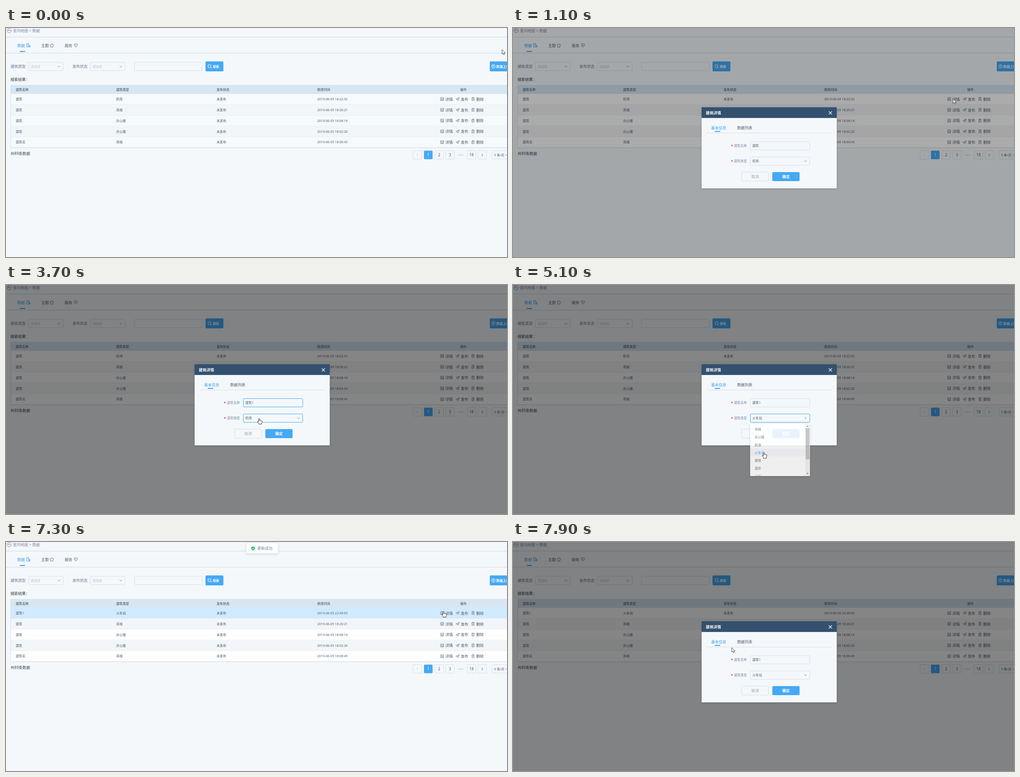
Write an HTML page that moves like this. It is 1105 by 507 pixels and loops after 8 s.

```html
<!DOCTYPE html>
<html lang="zh-CN">
<head>
<meta charset="utf-8">
<title>室内地图</title>
<style>
html, body { margin: 0; width: 100%; height: 100%; overflow: hidden; background: #f4f8fb; }
svg { display: block; width: 1105px; height: 507px; }
text { font-family: 'Noto Sans', 'Noto Sans CJK SC', 'Noto Sans CJK', sans-serif; white-space: pre; }
</style>
</head>
<body>
<svg id="stage" viewBox="0 0 1105 507" xmlns="http://www.w3.org/2000/svg"></svg>
<script>
const BLUE = '#45a9f5', INK = '#515a6e', LABEL = '#6b7690', EDGE = '#d7dfe7', PAPER = '#f4f8fb';
const BIG = 8.4, SMALL = 7.1;

// ---- drawing helpers ----
const text = (x, cy, str, size, fill, extra = '') =>
  `<text x="${x}" y="${(cy + size * 0.37).toFixed(2)}" font-size="${size}" fill="${fill}" ${extra}>${str}</text>`;
const mid = (x, cy, str, size, fill, extra = '') => text(x, cy, str, size, fill, 'text-anchor="middle" ' + extra);
const rect = (x, y, w, h, fill, extra = '') =>
  `<rect x="${x}" y="${y}" width="${w}" height="${h}" fill="${fill}" ${extra}/>`;
const box = (x, y, w, h, extra = '', fill = PAPER) => rect(x, y, w, h, fill, `rx="2" stroke="${EDGE}" ${extra}`);
const path = (x, y, d, color, width = 0.9, extra = '') =>
  `<path transform="translate(${x} ${y})" d="${d}" fill="none" stroke="${color}" stroke-width="${width}" stroke-linejoin="round" ${extra}/>`;
const chevron = (x, y, color = '#7f8794') => path(x, y, 'M-2.6-1.3L0 1.3L2.6-1.3', color, 1);
const group = (id, body, extra = '') => `<g id="${id}" ${extra}>${body}</g>`;
const BOLD = 'font-weight="700"';

const ICON = {
  back: 'M-5 0a5 5 0 1 0 10 0a5 5 0 1 0-10 0M-.4-2.6L-2.8-.6L-.4 1.3M-2.6-.6H1Q2.8-.4 2.4 2',
  data: 'M-3.5-4H1.5V-1M-3.5-4V3.5H0M-1.8-1.8H0M-1.8.4H-.5M1 0H4V3.8H1ZM1 1.9H4',
  star: 'M0-4L1.5-1.8L4.2-1.2L2.5 1L2.6 3.8H-2.6L-2.5 1L-4.2-1.2L-1.5-1.8Z',
  heart: 'M0 3.8L-3.6-.2Q-4.6-3.4-2-3.7Q-.5-3.5 0-2.2Q.5-3.5 2-3.7Q4.6-3.4 3.6-.2ZM-1.2 0H1.2',
  search: 'M-3.8-.6a3.2 3.2 0 1 0 6.4 0a3.2 3.2 0 1 0-6.4 0M1.8 1.8L4 4',
  upload: 'M-4 0a4 4 0 1 0 8 0a4 4 0 1 0-8 0M0 2.3V-2M-1.7-.4L0-2.1L1.7-.4',
  detail: 'M-3.3-3.3H3.3V3.3H-3.3ZM-3.3-.8H3.3M-1.6 1.2H1.6M-1.5 3V1.3M1.5 3V1.3',
  plane: 'M-3.6 0L3.6-3.4L1.8 3.2L-.6 1.2ZM3.6-3.4L-.6 1.2V3.4',
  trash: 'M-3.2-2.4H3.2M-1.2-2.4V-3.6H1.2V-2.4M-2.4-2.4V3.4H2.4V-2.4M-.8-.6V1.8M.8-.6V1.8'
};

// ---- page ----
const rows = [
  ['建筑', '机场', '18:22:52'],
  ['建筑', '商城', '18:20:21'],
  ['建筑', '办公楼', '18:08:16'],
  ['建筑', '办公楼', '18:02:20'],
  ['建筑名', '商城', '18:00:45']
];
const TOP = 145.8, STEP = 23.86;

function header() {
  const line = y => rect(0, y, 1105, 1, '#cfd8e0');
  return path(7, 5.5, ICON.back, '#7d8694') +
    text(15.3, 5.5, '室内地图 &gt; 数据', BIG, '#7a86a2') + line(19.5) + line(55) +
    text(25, 39, '数据', BIG, '#3d9df3') + path(49, 38.5, ICON.data, '#3d9df3') + rect(30.5, 51, 11.5, 2, '#3d9df3') +
    text(77.7, 39, '主题', BIG, INK) + path(101, 38.5, ICON.star, INK, 0.8) +
    text(129.5, 39, '服务', BIG, INK) + path(154, 38.5, ICON.heart, INK, 0.8);
}

function filters() {
  const pick = x => box(x, 76, 77, 18.5) + text(x + 4.8, 85.3, '请选择', SMALL, '#bcc3cc') + chevron(x + 67.3, 85.3);
  return text(10, 84.5, '建筑类型', BIG, LABEL) + pick(49.5) +
    text(146.5, 84.5, '发布状态', BIG, LABEL) + pick(186) +
    box(283.5, 76, 149, 18.5) +
    rect(440, 74, 39.5, 22, BLUE, 'rx="2"') + path(449.3, 85, ICON.search, '#fff', 1.1) +
    text(456, 85.5, '搜索', SMALL, '#fff', BOLD) +
    rect(1067, 74, 60, 22, BLUE, 'rx="2"') + path(1075, 85, ICON.upload, '#fff', 1) +
    text(1081.3, 85.5, '数据上传', 7.4, '#fff', BOLD) +
    text(10, 114, '搜索结果：', BIG, '#303642');
}

function table() {
  const heads = [[21.5, '建筑名称'], [243, '建筑类型'], [464.5, '发布状态'], [686.5, '修改时间'], [1001.7, '操作']];
  const acts = [[962, 'detail', '详情'], [996, 'plane', '发布'], [1030, 'trash', '删除']];
  let s = rect(10, 126, 1095, 20, '#d6e6f3') + heads.map(h => text(h[0], 136.4, h[1], SMALL, '#3b4350')).join('');
  rows.forEach((r, i) => {
    const y = TOP + i * STEP, c = 157.2 + i * 23.9;
    s += rect(10.5, y, 1095, STEP, i % 2 ? '#f2f6f9' : '#fff', i % 2 ? '' : 'class="stripe"');
    s += rect(10.5, y, 1095, STEP, '#d1eafe', 'class="hover"');
    s += rect(10.5, y + STEP - 0.8, 1095, 0.8, '#e3e9ee');
    s += text(21.5, c, r[0], SMALL, INK, `id="name${i}"`) + text(243, c, r[1], SMALL, INK, `id="type${i}"`) +
      text(464.5, c, '未发布', SMALL, INK) + text(686.5, c, '2019-06-05 ' + r[2], SMALL, INK, `id="time${i}"`);
    s += acts.map(a => path(a[0], c, ICON[a[1]], '#6c7480', 0.8) + text(a[0] + 7, c + 0.3, a[2], BIG, INK)).join('');
  });
  return s + rect(10, 126, 0.9, 139, '#d3dee8') + rect(10, 264.6, 1095, 1, '#d3dee8');
}

function pager() {
  const cells = [[907.5, ''], [931.4, '1'], [955.3, '2'], [979.1, '3'], [1026.8, '18'], [1050.5, '']];
  const arrow = (x, k, c) => path(x, 281.2, `M${-1.3 * k}-2.6L${1.3 * k} 0L${-1.3 * k} 2.6`, c, 1);
  return text(10, 277.8, '共89条数据', BIG, '#3b4350') +
    cells.map(([x, n]) => (n === '1' ? rect(x - 9.5, 271.5, 19, 19, BLUE, 'rx="2"') : box(x - 9.5, 271.5, 19, 19)) +
      mid(x, 281, n, BIG, n === '1' ? '#fff' : INK)).join('') +
    arrow(907.5, -1, '#c3c9d1') + arrow(1050.5, 1, INK) +
    [-4, 0, 4].map(d => `<circle cx="${1002.8 + d}" cy="281.3" r="1" fill="#a5adb8"/>`).join('') +
    box(1072, 271.5, 50, 18.5) + text(1076.5, 281, '5 条/页', SMALL, INK) + chevron(1104, 281);
}

// ---- dialog ----
function dialog() {
  const label = (cy, str) => mid(482.8, cy + 1.6, '*', 8.4, '#f0482f', BOLD) + text(487.5, cy, str, SMALL, '#7b88a8');
  return rect(416, 176, 298, 179, PAPER, 'filter="url(#shade)"') + rect(416, 175.5, 298, 23.7, '#33506f') +
    text(425.3, 187.8, '建筑详情', BIG, '#fff', BOLD) + path(700, 188, 'M-3.5-3.5L3.5 3.5M3.5-3.5L-3.5 3.5', '#fff', 1.1) +
    text(437, 221, '基本信息', BIG, '#3d9df3') + text(494.5, 221, '数据列表', BIG, INK) +
    rect(426, 232, 278, 1, '#d5dee6') + rect(445, 228, 12, 2, '#3d9df3') +
    label(260, '建筑名称') + box(523.5, 251.5, 131, 18.5, 'id="nameBox"') + text(528, 260.8, '建筑', SMALL, INK, 'id="nameVal"') +
    rect(542, 257, 0.8, 9, '#303642', 'id="caret"') +
    label(294.3, '建筑类型') + box(523.5, 285.5, 131, 18.5, 'id="typeBox"') + text(528, 294.8, '机场', SMALL, INK, 'id="typeVal"') +
    group('turn', chevron(0, 0)) +
    box(504.5, 319, 59, 20, 'stroke="#d0dae6"') + mid(534, 329, '取消', BIG, '#97a1b6') +
    rect(572, 319, 60, 20, BLUE, 'rx="2"') + mid(602, 329, '确定', BIG, '#fff', BOLD);
}

function menu() {
  const names = ['商城', '办公楼', '机场', '火车站', '展馆', '酒店', '小区'];
  const tri = (y, k) => `<path d="M647.5 ${y + k}h4l-2 ${-2 * k}z" fill="#555"/>`;
  return rect(523, 307, 132, 116, '#fff', 'rx="2" filter="url(#shade)"') +
    rect(523, 362.3, 122, 17.3, '#f5f7fa', 'id="pick"') +
    `<g clip-path="url(#list)">` +
    names.map((n, i) => text(533, 319.4 + i * 17.25, n, SMALL, '#6a6f78', `class="opt"`)).join('') + '</g>' +
    rect(645, 307.5, 9.5, 115, '#f1f1f1') + rect(645.5, 317, 8.5, 69, '#c1c1c1') + tri(312.5, 1) + tri(417.5, -1);
}

const toast = () => rect(530, 2, 70, 23.5, '#fff', 'rx="2.4" stroke="#e4e9f0" stroke-width=".7" filter="url(#shade)"') +
  '<circle cx="544.8" cy="14" r="4.2" fill="#2bb673"/>' + path(544.8, 14, 'M-2 0L-.5 1.5L2-1.3', '#fff', 1) +
  text(554.3, 14, '更新成功', BIG, '#68758c');

const cursors = () =>
  group('arrow', '<path d="M0 0V9.8L2.3 7.7L3.9 11.3L5.6 10.5L4.1 7.1H7.1Z" fill="#fff" stroke="#222" stroke-width=".8"/>') +
  group('hand', '<path d="M-1.2 1Q0-.6 1.2 1V5L2.6 4.8L4.4 5.2L6.4 6Q6.8 9 5.4 11V13H-.8V11.4Q-3 9-3.8 7Q-3.2 5.8-1.2 7.6Z" fill="#fff" stroke="#222" stroke-width=".9" stroke-linejoin="round"/>') +
  group('beam', path(0, 0, 'M-1.8-5H1.8M0-5V5M-1.8 5H1.8', '#333', 0.8));

const stage = document.getElementById('stage');
stage.innerHTML = `<defs>
  <filter id="shade" x="-20%" y="-40%" width="140%" height="180%"><feDropShadow dx="0" dy="1" stdDeviation="2" flood-opacity=".2"/></filter>
  <clipPath id="list"><rect x="523" y="307" width="122" height="115.5"/></clipPath></defs>` +
  rect(0, 0, 1105, 507, PAPER) + header() + filters() + table() + pager() +
  rect(0, 0, 1105, 507, '#000', 'id="veil"') +
  group('dialog', dialog()) + group('menu', menu()) + group('toast', toast()) + group('cursor', cursors());

// ---- timeline ----
const $ = id => document.getElementById(id);
const hovers = [...document.querySelectorAll('.hover')];
const stripes = [...document.querySelectorAll('.stripe')];
const opts = [...document.querySelectorAll('.opt')];

const MOVES = [
  [0, 1094, 48], [100, 1094, 48], [200, 1080, 68], [300, 1040, 116], [400, 988, 163], [500, 973, 160], [600, 970.5, 157],
  [1100, 970.5, 157], [1300, 850, 190], [1500, 640, 245], [1700, 565, 261], [3300, 562, 263], [3500, 560, 280], [3700, 558.5, 295],
  [3800, 558.5, 296], [4100, 553.5, 349.5], [4400, 553.5, 349.5], [4900, 553.5, 370.5], [5100, 553.5, 370.5], [5500, 611.5, 328],
  [5900, 611.5, 329], [6100, 611.5, 329], [6400, 780, 260], [6700, 935, 180], [6800, 952, 164], [7100, 965, 153.5],
  [7400, 965, 153.5], [7600, 760, 185], [7800, 520, 228], [7900, 482.5, 234]
];
const SHAPES = [[0, 'arrow'], [400, 'hand'], [900, 'arrow'], [1700, 'beam'], [3500, 'hand'], [6000, 'arrow'], [7000, 'hand'], [7400, 'arrow']];
const VEIL = [[800, 0], [900, 0.1], [1100, 0.33], [1200, 0.48], [5900, 0.48], [6000, 0.28], [6100, 0.11], [6200, 0], [7300, 0], [7700, 0.48]];
const DIALOG = [[800, 0], [900, 0.3], [1100, 1], [5900, 1], [6000, 0.4], [6100, 0], [7300, 0], [7600, 1]];
const MENU = [[3700, 0], [4000, 1], [5000, 1], [5100, 0.88], [5400, 0]];
const TURN = [[3700, 0], [3900, 180], [5000, 180], [5100, 270], [5200, 360]];
const TOAST = [[5900, 0], [6100, 1], [7200, 1], [7300, 0.88], [7500, 0]];

function at(track, t, k = 1) {
  let i = track.findIndex(p => p[0] > t);
  if (i < 0) return track[track.length - 1][k];
  if (i === 0) return track[0][k];
  const a = track[i - 1], b = track[i];
  return a[k] + (b[k] - a[k]) * (t - a[0]) / (b[0] - a[0]);
}
const within = (t, a, b) => t >= a && t < b;
const show = (el, on) => el.style.display = on ? '' : 'none';

function draw(t) {
  const x = at(MOVES, t, 1), y = at(MOVES, t, 2);
  const shape = SHAPES.filter(s => s[0] <= t).pop()[1];
  $('cursor').setAttribute('transform', `translate(${x} ${y})`);
  ['arrow', 'hand', 'beam'].forEach(id => show($(id), id === shape));

  const free = t < 900 || within(t, 6200, 7400);
  hovers.forEach((h, i) => show(h, free && y >= TOP + i * STEP && y < TOP + (i + 1) * STEP));
  stripes.forEach(s => s.setAttribute('opacity', t < 900 ? 0.2 : 1));

  const saved = t >= 6000;
  $('name0').textContent = saved ? '建筑1' : '建筑';
  $('type0').textContent = saved ? '火车站' : '机场';
  $('time0').textContent = '2019-06-05 ' + (saved ? '22:49:05' : '18:22:52');

  $('veil').setAttribute('opacity', at(VEIL, t));
  const d = at(DIALOG, t);
  show($('dialog'), d > 0);
  $('dialog').setAttribute('opacity', d);
  $('dialog').setAttribute('transform', `translate(0 ${(d - 1) * 12})`);
  $('nameVal').textContent = t >= 3000 ? '建筑1' : '建筑';
  $('typeVal').textContent = t >= 5100 ? '火车站' : '机场';
  show($('caret'), within(t, 2200, 2700));
  $('nameBox').setAttribute('stroke', within(t, 1900, 3800) ? BLUE : t === 1800 ? '#8ec4f0' : EDGE);
  $('typeBox').setAttribute('stroke', within(t, 3600, 5900) ? BLUE : EDGE);
  $('turn').setAttribute('transform', `translate(645 294.8) rotate(${at(TURN, t)})`);

  const m = at(MENU, t), squash = Math.min(1, m / 0.88);
  show($('menu'), m > 0);
  $('menu').setAttribute('opacity', m);
  $('menu').setAttribute('transform', `translate(0 ${307 * (1 - squash)}) scale(1 ${squash})`);
  show($('pick'), t >= 4800);
  opts.forEach((o, i) => o.setAttribute('fill', i === (t >= 5100 ? 3 : 2) ? '#409eff' : '#6a6f78'));

  const n = at(TOAST, t);
  show($('toast'), n > 0);
  $('toast').setAttribute('opacity', n);
  $('toast').setAttribute('transform', `translate(0 ${t < 6200 ? (n - 1) * 24 : 0})`);
}

const start = performance.now();
function tick() {
  const t = Math.max(0, performance.now() - start) % 8000;
  draw(Math.floor(t / 100) * 100);
  requestAnimationFrame(tick);
}
draw(0);
requestAnimationFrame(tick);
</script>
</body>
</html>
```
